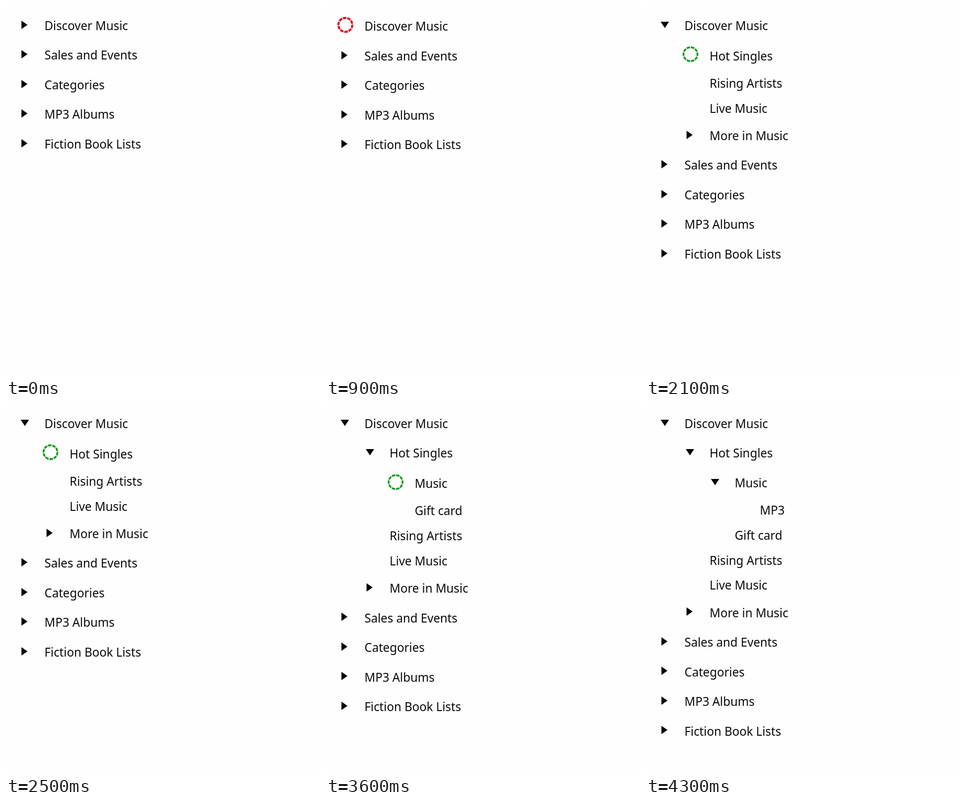
These frames come from a looping animation (600x706 px, 4600 ms). An HTML page:

```html
<!DOCTYPE html>
<html lang="en">
<head>
<meta charset="utf-8">
<title>Tree loading on demand</title>
<style>
  html, body { margin: 0; width: 100%; height: 100%; overflow: hidden; background: #fffeff; }
  svg { display: block; width: 600px; height: 706px; }
  text { font: 22.75px "Noto Sans", "Open Sans", sans-serif; fill: #0a0a0a; }
  .spinner { fill: none; stroke: #0a9812; stroke-width: 3.4; stroke-dasharray: 8 2; }
  .spinner.root { stroke: #e30b1c; stroke-width: 4; }
</style>
</head>
<body>
<svg id="stage" viewBox="0 0 600 706"></svg>
<script>
const LOOP = 4600, TICK = 100, TURN = 12;
const INDENT = 48, BRANCH = 56.5, LEAF = 47.8, LOADING = 1.35, TOP = 7.45;

// shown: stage in which the row appears; opens: stage in which it expands (9 = stays closed)
const rows = [
  { label: "Discover Music", depth: 0, shown: 0, opens: 1 },
  { label: "Hot Singles", depth: 1, shown: 1, opens: 2 },
  { label: "Music", depth: 2, shown: 2, opens: 3 },
  { label: "MP3", depth: 3, shown: 3 },
  { label: "Gift card", depth: 2, shown: 2 },
  { label: "Rising Artists", depth: 1, shown: 1 },
  { label: "Live Music", depth: 1, shown: 1 },
  { label: "More in Music", depth: 1, shown: 1, opens: 9 },
  { label: "Sales and Events", depth: 0, shown: 0, opens: 9 },
  { label: "Categories", depth: 0, shown: 0, opens: 9 },
  { label: "MP3 Albums", depth: 0, shown: 0, opens: 9 },
  { label: "Fiction Book Lists", depth: 0, shown: 0, opens: 9 }
];

const states = [
  { start: 0, stage: 0 },
  { start: 500, stage: 0, busy: true },
  { start: 1000, stage: 1 },
  { start: 2100, stage: 1, busy: true },
  { start: 2600, stage: 2 },
  { start: 3600, stage: 2, busy: true },
  { start: 4100, stage: 3 }
];

const svg = document.getElementById("stage");

function add(parent, tag, attrs, text) {
  const node = document.createElementNS("http://www.w3.org/2000/svg", tag);
  for (const key in attrs) node.setAttribute(key, attrs[key]);
  if (text) node.textContent = text;
  return parent.appendChild(node);
}

function drawIcon(group, row, state, x, y) {
  const open = row.opens <= state.stage;
  const at = `translate(${x} ${y})`;
  const points = open ? "28,-6 44,-6 36,6" : "29.5,-8 41,0 29.5,8";
  add(group, "polygon", { points, transform: at });
}

function drawSpinner(group, row, state, x, y) {
  const holder = add(group, "g", { transform: `translate(${x + 37} ${y})` });
  state.spinner = add(holder, "circle", {
    r: 13.3, pathLength: 100, class: row.depth ? "spinner" : "spinner root"
  });
}

function build(state) {
  const group = state.group = add(svg, "g", { visibility: "hidden" });
  let top = TOP;
  for (const row of rows) {
    if (row.shown > state.stage) continue;
    const height = row.opens ? BRANCH : LEAF;
    const loading = state.busy && row.opens === state.stage + 1;
    const middle = top + height / 2;
    const x = row.depth * INDENT;
    if (loading) drawSpinner(group, row, state, x, Math.round(middle));
    else if (row.opens) drawIcon(group, row, state, x, Math.round(middle));
    const baseline = Math.round(middle + 10.2 + (loading ? LOADING : 0));
    add(group, "text", { x: x + 73.5, y: baseline }, row.label);
    top += height + (loading ? LOADING : 0);
  }
}

states.forEach(build);

const begin = performance.now();

function render() {
  const time = (performance.now() - begin) % LOOP;
  const current = states.filter(s => s.start <= time).pop();
  for (const state of states) {
    state.group.setAttribute("visibility", state === current ? "visible" : "hidden");
  }
  if (current.spinner) {
    const step = Math.floor((time - current.start) / TICK);
    current.spinner.setAttribute("transform", `rotate(${step * TURN - 86.4})`);
  }
  requestAnimationFrame(render);
}
render();
</script>
</body>
</html>
```
